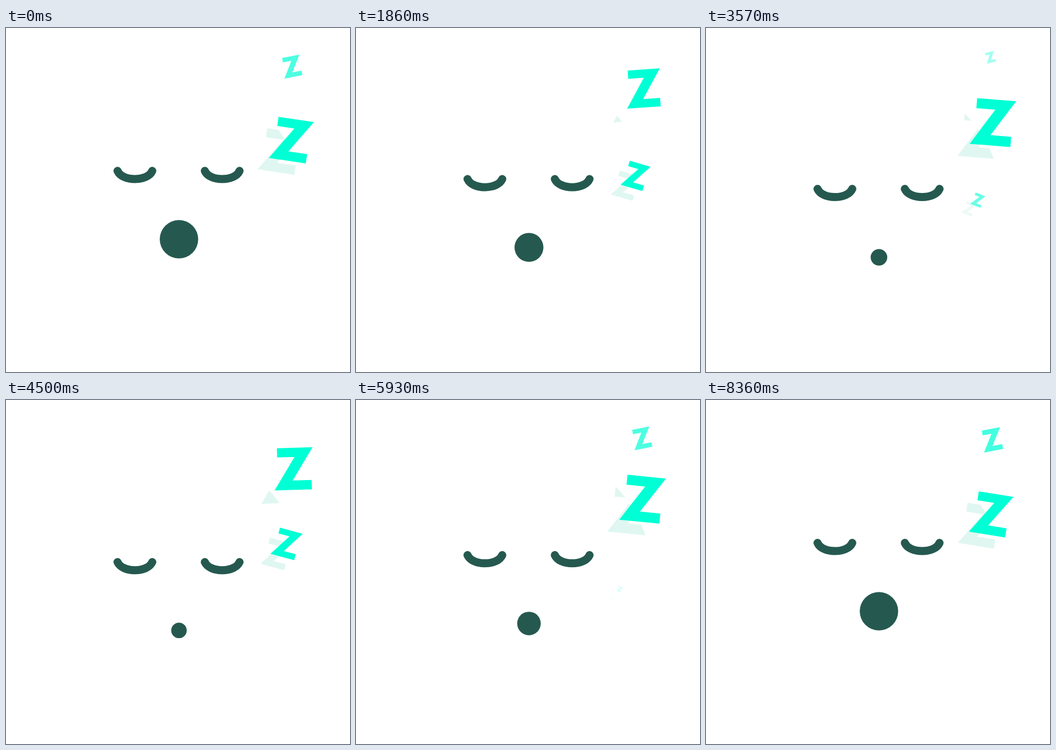
These frames come from a looping animation (640x640 px, 8430 ms). An HTML page:

```html
<!DOCTYPE html>
<html lang="en">
<head>
<meta charset="utf-8">
<title>Sleeping face</title>
<style>
  html, body { margin: 0; width: 100%; height: 100%; overflow: hidden; background: #fff; }
  svg { display: block; width: 100vw; height: 100vh; }
</style>
</head>
<body>
<svg viewBox="0 0 640 640">
  <defs>
    <clipPath id="head"><circle cx="321" cy="322" r="228.4"/></clipPath>
    <path id="zee" d="M-32-41.9H39.1L-2.5 23.2H35.2V41.9H-39.1L2.5-23.6H-32Z"/>
    <path id="eye" d="M-32.3 0C-28 9.5-15.500 15.200 0 15.200S28 9.500 32.300 0"/>
  </defs>
  <g id="face" fill="#25594f">
    <g fill="none" stroke="#25594f" stroke-width="15" stroke-linecap="round">
      <use href="#eye" x="239.800" y="265.800"/>
      <use href="#eye" x="402.200" y="265.800"/>
    </g>
    <circle id="mouth" cx="321.800" cy="393"/>
  </g>
  <g id="shadows" clip-path="url(#head)" fill="#e0f7f1"></g>
  <g id="letters" fill="#00ffd5"></g>
</svg>
<script>
const FRAMES = 118, FPS = 14, LOOP = 8430;
const BIRTHS = [6.8, 42, 83];
const PEAK = 45.6, GROWTH = 55.6;

// Path of a letter, one point every STEP frames, starting at age -STEP
const STEP = 20;
const PATH_X = [433, 490.7, 521, 532.8, 534.9, 530.7, 523, 515];
const PATH_Y = [430, 352, 271.6, 188.3, 115.7, 63.3, 36, 20];

const $ = id => document.getElementById(id);
const clamp = v => Math.max(0, Math.min(1, v));
const smooth = v => v * v * (3 - 2 * v);

// Symmetric cubic-bezier(c, 0, 1 - c, 1)
function ease(x, c) {
  let lo = 0, hi = 1;
  for (let i = 0; i < 24; i++) {
    const s = (lo + hi) / 2, r = 1 - s;
    if (3 * r * r * s * c + 3 * r * s * s * (1 - c) + s ** 3 < x) lo = s; else hi = s;
  }
  return smooth(lo);
}

// Catmull-Rom interpolation along a list of path values
function along(points, age) {
  const pos = age / STEP + 1;
  const i = Math.max(1, Math.min(points.length - 3, Math.floor(pos)));
  const t = pos - i;
  const [a, b, c, d] = points.slice(i - 1, i + 3);
  return b + t / 2 * (c - a + t * (2 * a - 5 * b + 4 * c - d + t * (3 * (b - c) + d - a)));
}

function addZee(parent) {
  const use = document.createElementNS("http://www.w3.org/2000/svg", "use");
  use.setAttribute("href", "#zee");
  return parent.appendChild(use);
}

const letters = BIRTHS.map(birth => ({
  birth, shadow: addZee($("shadows")), body: addZee($("letters"))
}));

function drawLetter({ birth, shadow, body }, frame) {
  const age = (frame - birth + 5 + FRAMES) % FRAMES - 5;
  const opacity = clamp(Math.min((age + 3.7) / 20, (95.7 - age) / 28));
  const x = along(PATH_X, age), y = along(PATH_Y, age);
  const scale = 1.03 * (0.03 + 0.97 * smooth(clamp(1 - Math.abs(age - PEAK) / GROWTH)));
  const pose = `rotate(${25.4 - 0.482 * age}) scale(${scale})`;
  const drop = 14.9 + 0.177 * age;
  body.setAttribute("transform", `translate(${x} ${y}) ${pose}`);
  shadow.setAttribute("transform", `translate(${x - drop} ${y + drop}) ${pose}`);
  body.setAttribute("opacity", opacity);
  shadow.setAttribute("opacity", opacity);
}

function draw(ms) {
  const frame = Math.floor((ms % LOOP + 5) * FPS / 1000) % FRAMES;
  const breath = 1 - Math.abs(1 - 2 * frame / FRAMES);
  $("face").setAttribute("transform", `translate(0 ${36.3 * ease(breath, 0.28)})`);
  // The mouth shrinks as the head sinks
  $("mouth").setAttribute("r", 35.75 - 21.6 * ease(breath, 0.345));
  letters.forEach(letter => drawLetter(letter, frame));
}

const start = performance.now();
function tick() {
  draw(performance.now() - start);
  requestAnimationFrame(tick);
}
tick();
</script>
</body>
</html>
```
